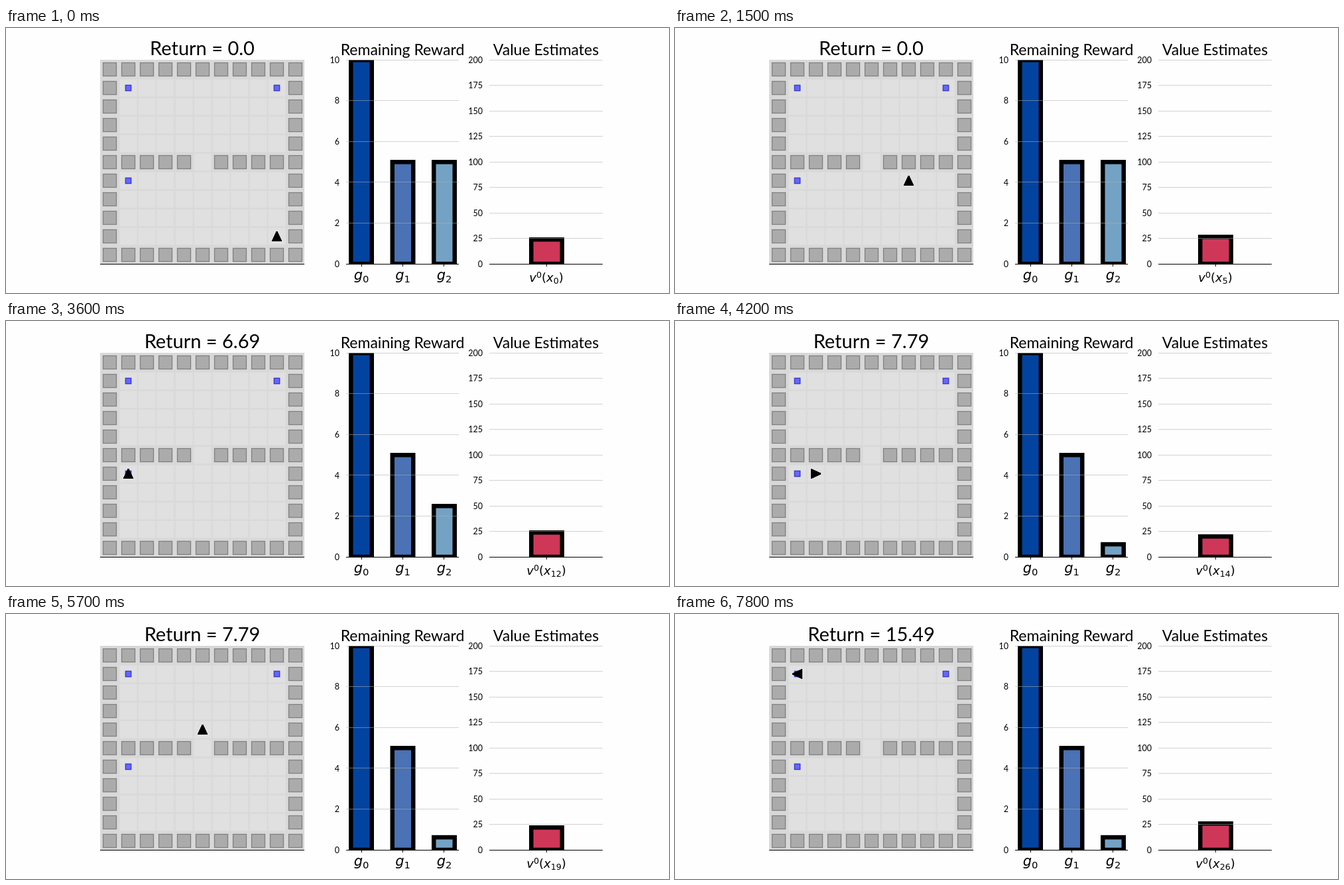
Recreate the animation shown at these times as an HTML page. Size 1000 px wide and 400 px high, loop 8 s.

```html
<!DOCTYPE html>
<html lang="en">
<head>
<meta charset="utf-8">
<title>Grid world returns</title>
<style>
  html, body { margin: 0; width: 100%; height: 100%; overflow: hidden; background: #fefefe; }
  svg { display: block; width: 1000px; height: 400px; }
  text { font-family: Lato, "Open Sans", sans-serif; text-anchor: middle; }
  .title { font-size: 29px; }
  .sub { font-size: 23px; }
  .tick { font-size: 12.5px; text-anchor: end; }
  .math { font-family: "DejaVu Sans", sans-serif; }
  .math .it { font-style: italic; }
  .wall { fill: #ababab; stroke: #808080; stroke-width: 1.3; }
  .goal { fill: #6666ff; stroke: #3333cc; stroke-width: 1.3; }
  .bar { stroke: #000; stroke-width: 6.5; }
  .grid { stroke: #b0b0b0; stroke-opacity: .55; }
  .axis { stroke: #000; }
</style>
</head>
<body>
<svg id="stage" viewBox="0 0 1000 400">
  <clipPath id="plot"><rect x="500" y="48" width="420" height="308"/></clipPath>
</svg>
<script>
const STEP = 300, LOOP = 8000, TOP = 48, BASE = 356, CELL = 28, GAMMA = 0.99;
const MOVES = "ULULU" + "LLLLLL" + "UU" + "RRRR" + "UUULLU" + "ULL";
const DIRS = { U: [0, -1, 0], R: [1, 0, 90], L: [-1, 0, -90] };
const GOALS = [[1, 1], [9, 1], [1, 6]];
// [step, top edge of the value bar]
const VALUE_TOPS = [[0, 316], [5, 312], [9, 310], [11, 309], [12, 316],
  [13, 319], [14, 322], [16, 321], [23, 317], [26, 313]];

const stage = document.getElementById("stage");

function add(parent, tag, attrs, text) {
  const el = document.createElementNS("http://www.w3.org/2000/svg", tag);
  for (const key in attrs) el.setAttribute(key, attrs[key]);
  if (text !== undefined) el.textContent = text;
  parent.appendChild(el);
  return el;
}
const rect = (parent, x, y, width, height, attrs) =>
  add(parent, "rect", { x, y, width, height, ...attrs });
const line = (x1, y1, x2, y2, cls) => add(stage, "line", { x1, y1, x2, y2, class: cls });
const label = (x, y, cls, text) => add(stage, "text", { x, y, class: cls }, text);
const centre = (col, row) => [156.5 + col * CELL, 62.5 + row * CELL];
const isWall = (col, row) =>
  col % 10 === 0 || row % 10 === 0 || (row === 5 && col !== 5);

function square(col, row, size, attrs) {
  const [x, y] = centre(col, row);
  rect(stage, x - size / 2, y - size / 2, size, size, attrs);
}

function drawRoom() {
  rect(stage, 142, TOP, 308, 308, { fill: "#d8d8d8" });
  for (let row = 0; row < 11; row++) {
    for (let col = 0; col < 11; col++) {
      if (isWall(col, row)) square(col, row, 20, { class: "wall" });
      else square(col, row, 26, { fill: "#e0e0e0" });
    }
  }
  for (const [col, row] of GOALS) square(col, row, 8.4, { class: "goal" });
  line(142, 356.5, 450, 356.5, "axis");
}

function drawAxes(left, right, max, unit, name, centres) {
  for (let v = 0; v <= max; v += unit) {
    const y = BASE - v / max * (BASE - TOP);
    if (v) line(left, Math.floor(y) + .5, right, Math.floor(y) + .5, "grid");
    label(left - 10, y + 4.7, "tick", v);
  }
  line(left, 356.5, right, 356.5, "axis");
  for (const x of centres) line(x, 356, x, 360, "axis");
  label((left + right) / 2, 40.5, "sub", name);
}

function mathLabel(x, y, size, parts) {
  const text = add(stage, "text", { x, y, class: "math", "font-size": size });
  let last = 0;
  return parts.map(([str, shift, italic]) => {
    const span = add(text, "tspan", { dy: shift - last, class: italic ? "it" : "" }, str);
    if (shift) span.setAttribute("font-size", size * .7);
    last = shift;
    return span;
  });
}

function setTop(bar, y) {
  bar.setAttribute("y", y);
  bar.setAttribute("height", BASE - y);
}

function valueTop(step) {
  const i = Math.max(1, VALUE_TOPS.findIndex(p => p[0] >= step));
  const [a, ya] = VALUE_TOPS[i - 1], [b, yb] = VALUE_TOPS[i];
  return Math.round(ya + (yb - ya) * (step - a) / (b - a));
}

// Each visit pays the goal's discounted reward, then halves what is left.
function simulate() {
  const left = { "1,1": 10, "9,1": 5, "1,6": 5 };
  let col = 9, row = 9, total = 0;
  const states = [{ col, row, turn: 0, total, rewards: Object.values(left) }];
  [...MOVES].forEach((move, i) => {
    const [dx, dy, turn] = DIRS[move];
    const here = col + "," + row;
    if (here in left) left[here] /= 2;
    if (!isWall(col + dx, row + dy)) { col += dx; row += dy; }
    total += (left[col + "," + row] || 0) * GAMMA ** (i + 1);
    states.push({ col, row, turn, total, rewards: Object.values(left) });
  });
  return states;
}

drawRoom();
const agent = add(stage, "path", {
  d: Array.from({ length: 7 }, (_, i) =>
    `M${-1.5 - i} ${-7.5 + i * 15 / 7}h${3 + 2 * i}v2.2h${-3 - 2 * i}z`).join("")
});

const barLayer = add(stage, "g", { "clip-path": "url(#plot)" });
const addBar = (x, width, fill) => rect(barLayer, x - width / 2, TOP, width, 0, { class: "bar", fill });
const rewardXs = [536, 598.5, 661];
const rewardBars = ["#0343a0", "#4a72b4", "#74a2c4"].map((c, i) => addBar(rewardXs[i], 31.5, c));
const valueBar = addBar(815.5, 46.5, "#cf3759");

drawAxes(513, 683, 10, 2, "Remaining Reward", [536.5, 598.5, 660.5]);
drawAxes(729, 900, 200, 25, "Value Estimates", [815.5]);
rewardXs.forEach((x, i) => mathLabel(x, 380, 21, [["g", 0, true], [i, 3.5]]));
const stepText = mathLabel(815, 383, 18,
  [["v", 0, true], ["0", -6.5], ["(", 0], ["x", 0, true], ["0", 3], [")", 0]])[4];
const title = label(296, 40.5, "title", "");

const states = simulate();

function show(step) {
  const { col, row, turn, total, rewards } = states[step];
  agent.setAttribute("transform", `translate(${centre(col, row)}) rotate(${turn})`);
  title.textContent = "Return = " + (total ? total.toFixed(2) : "0.0");
  stepText.textContent = step;
  rewardBars.forEach((bar, i) => setTop(bar, BASE - rewards[i] * 30.8 + .3));
  setTop(valueBar, valueTop(step) + 3.25);
}

const start = performance.now();
function tick() {
  const time = (performance.now() - start) % LOOP;
  show(Math.min(MOVES.length, Math.floor(time / STEP)));
  requestAnimationFrame(tick);
}
tick();
</script>
</body>
</html>
```
